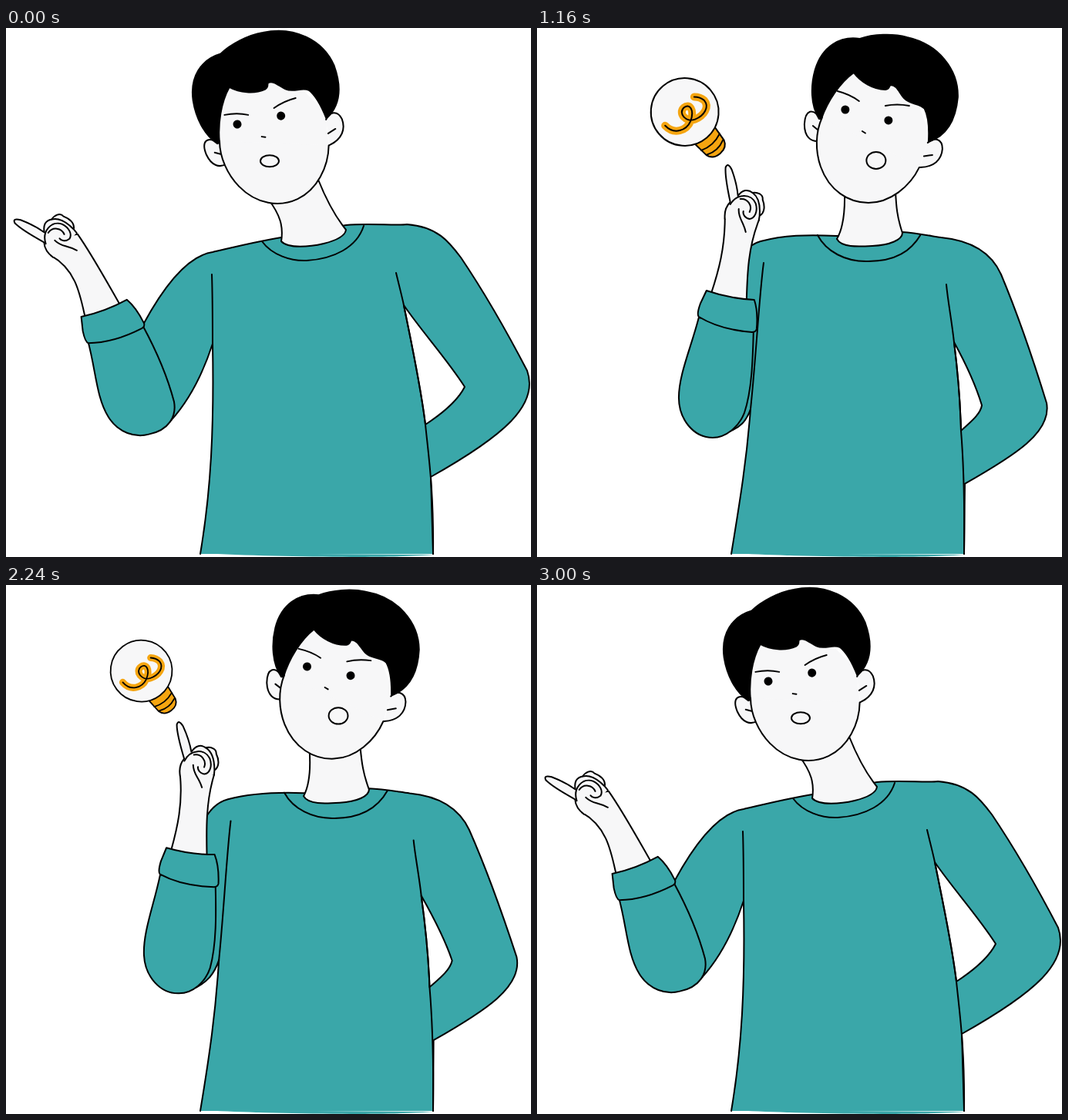
These frames come from a looping animation (681 by 687 pixels, 3.04 s). An HTML page:

```html
<!DOCTYPE html>
<html lang="en">
<head>
<meta charset="utf-8">
<title>Bright idea</title>
<style>
html, body { margin: 0; width: 100%; height: 100%; overflow: hidden; background: #fff; }
svg { display: block; width: 100%; height: 100%; }
path, circle, ellipse { stroke: #000; stroke-width: 2; stroke-linecap: round; stroke-linejoin: round; }
.skin { fill: #f7f7f8; }
.shirt { fill: #3aa7a9; }
.line { fill: none; }
.hole { fill: #fff; }
.flat { stroke: none; }
.glow { fill: none; stroke: #f5a510; stroke-width: 10; }
.base { fill: #f5a510; }
</style>
</head>
<body>
<svg viewBox="0 0 681 687">
  <path class="shirt flat" d="M252 682C340 687 500 689 554 684Z"/>
  <path id="body" class="shirt"/>
  <path id="hole" class="hole"/>
  <path id="seams" class="line"/>
  <path id="neck" class="skin"/>

  <g id="head">
    <path class="skin" d="M368 118C358 103 348 106 347 125C347 141 355 148 366 147"/>
    <path class="line" d="M358 127L364 132"/>
    <path class="skin flat" d="M366 150L372 108L411 50L490 85L510 140L496 181L430 215Z"/>
    <path class="skin" d="M370 116C361 136 361 160 368 180C379 211 404 227 430 227C458 227 484 206 496 181"/>
    <path class="skin" d="M507 149C515 141 526 144 526 157C525 171 515 181 497 181"/>
    <path class="line" d="M502 166.500L513 165"/>
    <path d="M366 118C355 100 355 75 361 54C370 24 393 10 419 14C436 8 462 7 480 12C521 21 547 54 546 90C543 123 529 141 508 148C509 131 508 115 503 105C496 97 484 100 476 91C470 84 467 74 459 74C456 76 458 79 452 80C436 80 420 70 411 58C393 71 377 95 369 118Z"/>
    <circle cx="400" cy="106" r="4.500"/>
    <circle cx="456" cy="120" r="4.500"/>
    <path class="line" d="M422 134L426 136.500"/>
    <path id="brows" class="line" d="M390 82Q406 86 418 95M452 101Q467 98 483 101"/>
    <ellipse id="mouth" class="skin"/>
  </g>

  <g id="arm">
    <path id="forearm" class="shirt"/>
    <path id="wrist" class="skin"/>
    <path class="shirt" d="M220 341C240 348 262 352 282 353C286 365 286 380 285 391Q284 395 279 395C252 393 228 386 210 375Q207 372 212 358Z"/>
    <g id="hand">
      <path class="skin" d="M244 248C243 238 246 231 251 226C248 212 244 192 245 181Q248 174 253 184C257 195 260 207 261 218C267 210 274 209 280 214C286 213 294 216 293 223C296 231 296 240 289 244L288 250"/>
      <path class="line" d="M251 229C260 214 279 215 284 228C287 238 283 247 276 248C270 247 267 242 268 238M262 235C261 247 268 251 271 265M280 214C287 219 290 230 289 243M264 222C274 221 280 231 276 239"/>
    </g>
  </g>

  <g id="bulb">
    <path class="base" d="M-17 -32H17L15 -10Q12 0 0 0Q-12 0 -15 -10Z"/>
    <path class="line" d="M-16 -19Q0 -13 16 -20M-14 -10Q0 -4 14 -11"/>
    <circle class="skin" cy="-71" r="44"/>
    <g transform="translate(0 -71)">
      <path class="glow coil"/>
      <path class="line coil"/>
      <path class="glow ray" style="stroke-width:12"/>
      <path class="line ray"/>
    </g>
  </g>
</svg>
<script>
const LOOP = 3040, STEP = 40, PEAK = 1520, END = 3000, FALL = 1500;
const $ = id => document.getElementById(id);
const mix = (a, b, p) => a + (b - a) * p;
const clamp = x => Math.max(0, Math.min(1, x));
const setAll = (selector, d) => document.querySelectorAll(selector).forEach(el => el.setAttribute("d", d));

// Each shape: path at rest, path with the arm raised.
const shapes = {
  body: [
    "M252 683C266 600 270 520 268 410C255 450 235 490 206 518L150 470L178 385C205 335 235 296 268 291C290 286 330 276 357 272L441 256C470 253 505 257 520 255C560 258 575 278 590 298C625 350 650 395 676 445C692 490 645 530 551 583L554 683",
    "M252 683C264 610 272 560 277 495C272 510 264 520 244 526L215 450L250 345C255 308 268 283 290 277C320 269 350 268 389 270L474 265C490 266 505 269 524 272C565 276 590 293 602 320C625 375 645 435 661 487C668 525 620 555 555 592L554 683"],
  hole: [
    "M516 360C540 395 572 430 595 466C588 480 570 498 544 515C538 465 527 415 516 360Z",
    "M541 408C553 430 568 460 577 490C575 502 562 512 550 523C549 480 545 440 541 408Z"],
  seams: [
    "M506 318C510 335 514 350 516 360C527 415 538 465 544 515C548 555 555 600 554 683M267 320C268 350 268 380 268 410M332 277C345 295 370 303 390 302C425 300 455 285 464 257",
    "M531 333C533 355 538 380 541 408C545 440 549 480 550 523C553 560 555 600 554 683M294 305C288 350 284 430 277 495M364 269C375 290 400 304 430 303C465 303 485 290 498 268"],
  neck: [
    "M340 222C356 243 360 258 357 277C366 287 395 284 412 280C428 276 440 270 441 262C428 246 415 222 405 197",
    "M399 212C400 245 396 262 389 274C395 285 415 284 435 283C458 282 474 275 474 266C467 245 466 232 465 210"],
  forearm: [
    "M211 372C200 410 182 440 182 470C182 495 198 512 215 517C240 526 258 516 265 498C275 465 280 430 282 393Z",
    "M210 376C200 415 184 450 184 480C184 508 203 532 228 532C245 532 262 518 269 500C279 470 280 430 281 393Z"],
  wrist: [
    "M224 344C234 315 246 285 228 253L250 238L272 247C274 280 272 320 271 353",
    "M226 345C236 315 244 285 244 247L266 235L288 250C274 285 273 320 272 353"]
};

// Tilt of the bulb: time, degrees.
const tilt = [[0, 10], [280, -18], [720, -46], [1640, -34], [2240, -37], [2560, -45], [3000, -48], [LOOP, -48]];
// Rays of the bulb: angle, inner and outer distance.
const rays = [[-65, 61, 74], [-29, 63, 77], [2, 60, 74], [41, 58, 77], [77, 55, 78]];

setAll(".coil", "M-31 -3C-30 14 -14 20 -2 14C12 6 12 -5 3 -5C-8 -5 -8 12 4 16C16 20 29 16 29 5Q28 -2 22 -7");

function tween([a, b], p) {
  const from = a.match(/-?\d+/g);
  let i = 0;
  return b.replace(/-?\d+/g, n => mix(+from[i++], +n, p).toFixed(2));
}

function turn([x, y], [cx, cy], deg) {
  const r = deg * Math.PI / 180, c = Math.cos(r), s = Math.sin(r);
  x -= cx; y -= cy;
  return [cx + x * c - y * s, cy + x * s + y * c];
}

function raise(t) {
  if (t < PEAK) {
    const u = 1 - t / PEAK;
    return 1 - .45 * u ** 4 - .55 * u ** 18;
  }
  const u = clamp((t - END + FALL) / FALL);
  return 1 - .5 * u ** 2.5 - .5 * u ** 6;
}

function tiltAt(t) {
  const i = tilt.findIndex(k => k[0] > t);
  const [t0, a] = tilt[i - 1], [t1, b] = tilt[i];
  return mix(a, b, .5 - .5 * Math.cos(Math.PI * (t - t0) / (t1 - t0)));
}

function rayPath(t) {
  const phase = t % 1000;
  const grow = clamp((phase - 240) / 100), shrink = clamp((phase - 850) / 150);
  if (grow <= shrink) return "";
  return rays.map(([deg, near, far]) => {
    const at = k => turn([0, -mix(near, far, k)], [0, 0], deg).map(v => v.toFixed(2)).join(" ");
    return `M${at(shrink)}L${at(grow)}`;
  }).join("");
}

function draw(t) {
  const p = raise(t), rest = 1 - p;
  const set = (id, value) => $(id).setAttribute("transform", value);
  for (const id in shapes) $(id).setAttribute("d", tween(shapes[id], p));

  set("head", `rotate(${-24.9 * rest} 393 342)`);
  set("brows", `translate(0 ${6 * rest})`);
  set("mouth", `translate(${440 - 22 * rest} ${172 - 5 * rest}) rotate(${25 * rest})`);
  $("mouth").setAttribute("rx", 12.5 - .5 * rest);
  $("mouth").setAttribute("ry", 11 - 3.5 * rest);

  const swing = -31.5 * rest, bend = -17.5 * rest, slide = -20 * rest;
  set("arm", `rotate(${swing} 219 575)`);
  set("hand", `translate(${slide} 0) rotate(${bend} 274 235)`);

  const [hx, hy] = turn([247, 178], [274, 235], bend);
  const [x, y] = turn([hx + slide, hy], [219, 575], swing);
  set("bulb", `translate(${x - 9} ${y - 15}) rotate(${tiltAt(t)}) scale(${p})`);
  $("bulb").style.display = p > .01 ? "" : "none";
  setAll(".ray", rayPath(t));
}

const start = performance.now();
function frame() {
  const t = (performance.now() - start) % LOOP;
  draw(Math.floor(t / STEP) * STEP);
  requestAnimationFrame(frame);
}
frame();
</script>
</body>
</html>
```
